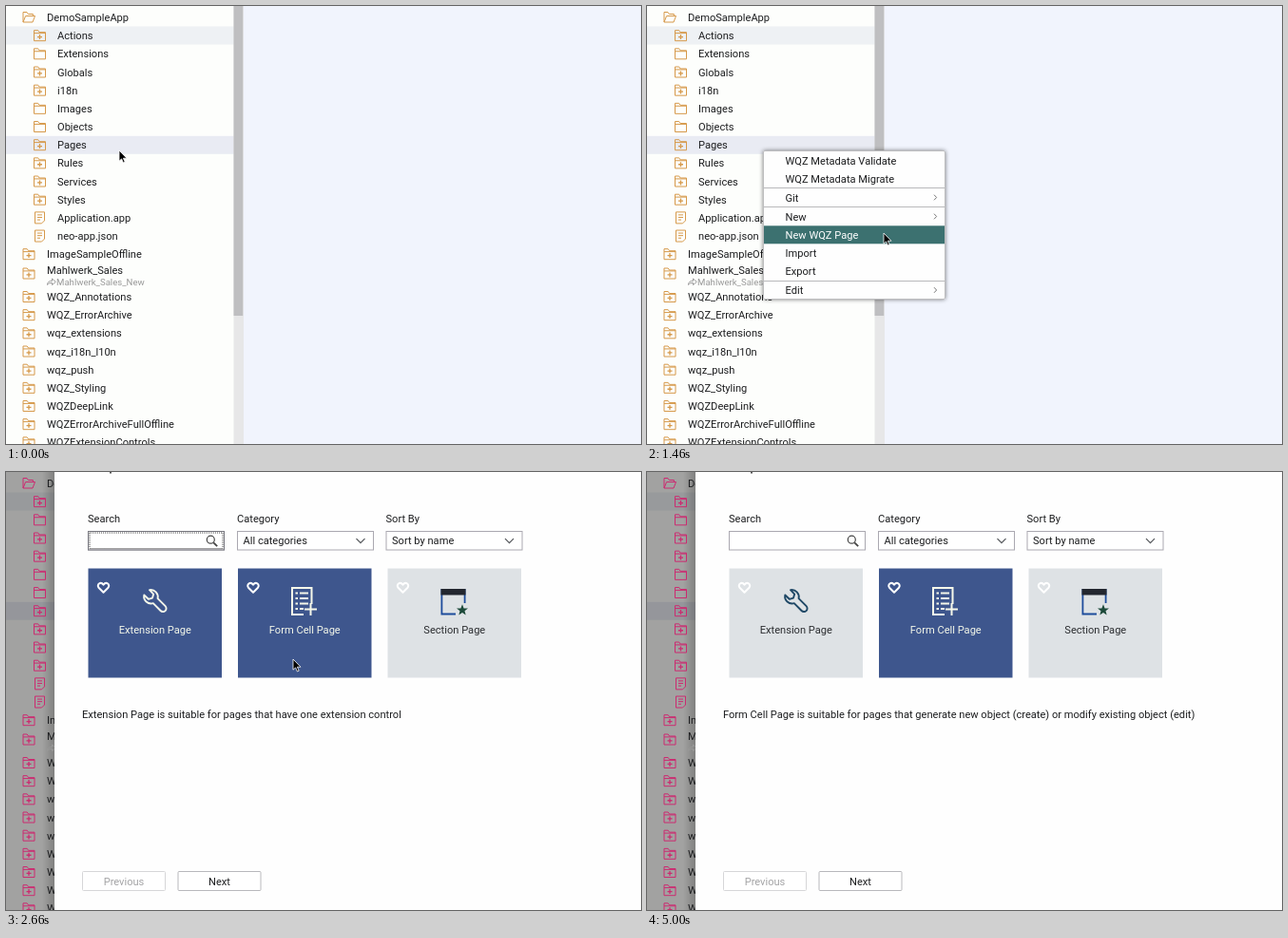
These frames come from a looping animation (668x461 px, 5.06 s). An HTML page:

```html
<!DOCTYPE html>
<html lang="en">
<head>
<meta charset="utf-8">
<title>New page wizard</title>
<style>
html, body { margin: 0; width: 100%; height: 100%; overflow: hidden; background: #fff; }
svg { display: block; width: 668px; height: 461px; }
text { font: 11.1px Roboto, Arial, sans-serif; fill: #1c1d1f; white-space: pre; }
.line { fill: none; stroke: currentColor; }

.pick, .tree, .dim, .menu, .item, .final, .dialog, .card, .caret, .focus, .before, .after, .shown {
  animation: 5060ms step-end infinite;
}

/* project tree */
.tree { color: #d6994a; animation-name: tree; }
.sub { font-size: 9.6px; fill: #999; }
.pick { fill: #e9ebf3; animation-name: pick; }
.dim { animation-name: dialog; }
@keyframes tree { 0% { color: #d6994a } 35.57%, 100% { color: #cc2a70 } }
@keyframes pick { 0% { fill: #e9ebf3 } 13.04% { fill: #dfe1f6 } 19.76%, 100% { fill: #e9ebf3 } }

/* context menu */
.menu { opacity: 0; animation-name: menu; }
.item rect { fill: var(--bg, transparent); }
.item text { fill: var(--fg, #1c1d1f); }
.pass { animation-name: pass; }
.final { animation-name: final; }
@keyframes menu { 0% { opacity: 0 } 13.04% { opacity: 1 } 35.57%, 100% { opacity: 0 } }
@keyframes pass { 0% { --bg: #3c7170; --fg: #fff } 1.3%, 100% { --bg: transparent; --fg: #1c1d1f } }
@keyframes final { 0% { --bg: transparent; --fg: #1c1d1f } 26.28%, 100% { --bg: #3c7170; --fg: #fff } }

/* wizard */
.dialog { animation-name: dialog; }
.caret { animation-name: caret; }
.focus { animation-name: focus; }
.before { animation-name: before; }
.after { animation-name: after; }
@keyframes dialog { 0% { opacity: 0 } 35.57%, 100% { opacity: 1 } }
@keyframes caret { 0%, 36.95% { opacity: 1 } 47.43%, 100% { opacity: 0 } }
@keyframes focus { 0% { opacity: 1 } 56.52%, 100% { opacity: 0 } }
@keyframes before { 0% { opacity: 1 } 56.52%, 100% { opacity: 0 } }
@keyframes after { 0% { opacity: 0 } 56.52%, 100% { opacity: 1 } }

.card > rect { fill: var(--bg); }
.card > text { fill: var(--fg); text-anchor: middle; }
.card g { color: var(--ink); }
.ext { animation-name: ext; }
.form { animation-name: form; }
.sect { animation-name: sect; }
@keyframes ext {
  0% { --bg: #57995a; --fg: #fff; --ink: #fff }
  47.43% { --bg: #3e568d; --fg: #f5f8ea; --ink: #f5f8ea }
  56.52%, 100% { --bg: #dee2e5; --fg: #2b2d30; --ink: #1f4866 }
}
@keyframes form {
  0% { --bg: #e7edf3; --fg: #606266; --ink: #3b66c0; --alt: #3c8d50 }
  47.43%, 100% { --bg: #3e568d; --fg: #f5f8ea; --ink: #f5f8ea; --alt: #f5f8ea }
}
@keyframes sect {
  0% { --bg: #e7edf3; --fg: #606266; --ink: #3b66c0; --top: #213f80; --alt: #2f7a55 }
  47.43%, 100% { --bg: #dee2e5; --fg: #2b2d30; --ink: #1d4c9c; --top: #23272f; --alt: #1d4a3a }
}

/* pointer */
.shown { animation-name: shown; }
.pointer { animation: move 5060ms ease-in-out infinite; }
@keyframes shown { 0% { opacity: 1 } 77.66%, 100% { opacity: 0 } }
@keyframes move {
  0%, 1% { transform: translate(119px, 152px) }
  2.5%, 18.58% { transform: translate(121px, 151px) }
  28.85% { transform: translate(249px, 239px) }
  32.8%, 35.57% { transform: translate(250px, 241px) }
  42.09%, 45% { transform: translate(265px, 237px) }
  52.57%, 57% { transform: translate(302px, 197px) }
  65.8% { transform: translate(281px, 269px) }
  72.33%, 100% { transform: translate(225px, 430px) }
}
</style>
</head>
<body>
<svg id="stage" viewBox="0 0 668 461" xmlns="http://www.w3.org/2000/svg">
  <defs>
    <path id="folder" class="line" d="M-6 5.5V-5.5h4.2l1.4 2H6V5.5zM-6-2.6H6"/>
    <g id="plus"><use href="#folder"/><path class="line" stroke-width="1.3" d="M-2.5 1.4h5M0-1.1v5"/></g>
    <path id="open" class="line" d="M-6 5V-5.5h4l1.4 2h5v2M-6 5l2.6-6.5H6.5L4 5z"/>
    <path id="file" class="line" d="M-5-6H5v9l-3 3h-7zM-2.5-3h5M-2.5-.4h5M-2.5 2.2h3"/>
    <path id="heart" fill="none" stroke="#fff" stroke-width="2" stroke-linejoin="round"
      d="M0 5.2-5 .2C-7.5-3-3-6.8 0-2.8 3-6.8 7.5-3 5 .2z"/>
    <path id="down" fill="none" stroke="#55585c" stroke-width="1.3" d="M-4.5-2.2 0 2.3 4.5-2.2"/>
    <linearGradient id="edge"><stop stop-opacity="0"/><stop offset="1" stop-opacity=".22"/></linearGradient>
    <filter id="shadow" x="-10%" y="-10%" width="120%" height="120%">
      <feDropShadow dx="0" dy="0" stdDeviation="2" flood-opacity=".5"/>
    </filter>
  </defs>
</svg>
<script>
const STEP = 19.17;

const label = (x, mid, str, attrs = '') => `<text x="${x}" y="${mid + 4}" ${attrs}>${str}</text>`;
const box = (x, y, w, h, attrs) => `<rect x="${x}" y="${y}" width="${w}" height="${h}" ${attrs}/>`;
const icon = (id, x, y, attrs = '') => `<use href="#${id}" x="${x}" y="${y}" ${attrs}/>`;

function tree() {
  const row = (depth, y, kind, name) =>
    icon(kind, depth ? 35.5 : 24, y) + label(depth ? 54 : 43, y, name);
  const kids = [
    ['plus', 'Actions'], ['folder', 'Extensions'], ['plus', 'Globals'], ['plus', 'i18n'],
    ['folder', 'Images'], ['folder', 'Objects'], ['plus', 'Pages'], ['plus', 'Rules'],
    ['plus', 'Services'], ['plus', 'Styles'], ['file', 'Application.app'], ['file', 'neo-app.json']
  ];
  const projects = ['WQZ_Annotations', 'WQZ_ErrorArchive', 'wqz_extensions', 'wqz_i18n_l10n', 'wqz_push',
    'WQZ_Styling', 'WQZDeepLink', 'WQZErrorArchiveFullOffline', 'WQZExtensionControls'];
  return box(0, 0, 240, 461, 'fill="#fdfefc"')
    + box(0, 21.5, 240, 19, 'fill="#eef1f4"')
    + box(0, 136.8, 240, 19, 'class="pick"')
    + box(250, 0, 418, 461, 'fill="#f1f4fd"')
    + box(239.5, 0, 10.5, 461, 'fill="#e7e7e8"')
    + box(239.5, 0, 9.7, 326, 'fill="#bfbfc1"')
    + `<g class="dim">${box(0, 0, 52, 461, 'opacity=".36"')}${box(38, 0, 14, 461, 'fill="url(#edge)"')}</g>`
    + '<g class="tree">'
    + row(0, 12, 'open', 'DemoSampleApp')
    + kids.map(([kind, name], i) => row(1, 12 + STEP * (i + 1), kind, name)).join('')
    + row(0, 261.2, 'plus', 'ImageSampleOffline')
    + icon('plus', 24, 281.5) + label(43, 278.3, 'Mahlwerk_Sales')
    + label(53, 289.6, 'Mahlwerk_Sales_New', 'class="sub"')
    + '<path d="M43.5 293.5c0-3 2-4.2 5-4.2v-2.3l3.8 3.4-3.8 3.2v-2.2c-2 0-4 .3-5 2.1z" fill="none" stroke="#999"/>'
    + projects.map((name, i) => row(0, 306 + STEP * i, 'plus', name)).join('')
    + '</g>';
}

function menu() {
  // [name, middle, has submenu, hover time in ms]
  const items = [
    ['WQZ Metadata Validate', 162.5, 0, 1070], ['WQZ Metadata Migrate', 181.7, 0, 1130],
    ['Git', 201.5, 1, 1200], ['New', 221.5, 1, 1270], ['New WQZ Page', 240.8],
    ['Import', 260], ['Export', 279.2], ['Edit', 299, 1]
  ];
  const rows = items.map(([name, y, more, at], i) => {
    const mode = at ? 'pass' : i === 4 ? 'final' : '';
    return `<g class="item ${mode}" style="animation-delay:${at || 0}ms">`
      + box(123, y - 9.5, 190, 19, '')
      + label(145.5, y, name)
      + (more ? `<path d="M302 ${y - 2.8}l2.6 2.8-2.6 2.8" fill="none" stroke="#777"/>` : '')
      + '</g>';
  });
  return '<g class="menu">'
    + box(122.5, 152.5, 191, 156, 'rx="1.5" fill="#fefefe" stroke="#bdbdbf" filter="url(#shadow)"')
    + rows.join('')
    + '<path d="M123 191.5h190M123 211.5h190M123 289.5h190" stroke="#b9b9bb"/></g>';
}

function star(cx, cy, r) {
  const pts = Array.from({ length: 10 }, (_, i) => {
    const a = i * Math.PI / 5, d = i % 2 ? r * .42 : r;
    return `${(cx + d * Math.sin(a)).toFixed(1)},${(cy - d * Math.cos(a)).toFixed(1)}`;
  });
  return `<polygon points="${pts.join(' ')}" fill="var(--alt)"/>`;
}

function cards() {
  const card = (cls, x, name, art) => `<g class="card ${cls}">`
    + box(x, 101.5, 140.5, 115, '') + icon('heart', x + 16, 121.5)
    + `<g>${art}</g>` + label(x + 70.3, 165.5, name) + '</g>';
  const wrench = `<path class="line" stroke-width="1.9" stroke-linejoin="round"
    d="M151 124.2A7.5 7.5 0 0 1 159.6 133.2L167.6 141.2A3.4 3.4 0 0 1 162.6 146L154.8 138.2
    A7.5 7.5 0 0 1 145.3 129.5L149.8 133.8 154 132.6 155.2 128.6z"/>`;
  const form = '<path class="line" stroke-width="2" d="M313 150h-12v-28h20.500v17'
    + [127.5, 133, 138.5, 144].map((y, i) => `M304.5 ${y}h2.5M309 ${y}h${i < 3 ? 9 : 4}`).join('') + '"/>'
    + '<path d="M314 144.500h13M320.500 138v13" stroke="var(--alt)" stroke-width="2"/>';
  const section = '<path class="line" stroke-width="1.8" d="M473 149.500h-14.600V124h24.200v14"/>'
    + box(457.5, 123, 26, 6.5, 'fill="var(--top)"') + star(480, 145.500, 6.3);
  return card('ext', 86.5, 'Extension Page', wrench)
    + card('form', 244, 'Form Cell Page', form)
    + card('sect', 401.5, 'Section Page', section);
}

function dialog() {
  const field = (x, name, value) => label(x, 49, name)
    + box(x + .5, 62.5, 143, 19.5, 'fill="#fff" stroke="#aaa8b0"')
    + (value ? label(x + 6.5, 72.3, value) + icon('down', x + 130, 72.3) : '');
  const button = (x, name, line, ink) =>
    box(x + .5, 420.5, 87, 20, `rx="1" fill="#fff" stroke="${line}"`)
    + label(x + 44, 430.8, name, `text-anchor="middle" style="fill:${ink}"`);
  return '<g class="dialog">'
    + box(51, 0, 617, 461, 'fill="#fefefe"')
    + box(109, 0, 2, 1.5, 'fill="#555"')
    + field(86, 'Search') + field(243, 'Category', 'All categories') + field(399.5, 'Sort By', 'Sort by name')
    + '<g class="focus">' + box(86.5, 62.5, 143, 19.5, 'fill="none" stroke="#77777f"')
    + box(88, 64, 140, 16.5, 'fill="none" stroke="#444" stroke-dasharray="1 1"') + '</g>'
    + box(93, 66, 1, 12, 'class="caret" fill="#333"')
    + '<path d="M218.300 74.300l3.900 3.900" stroke="#444" stroke-width="1.8"/>'
    + '<circle cx="215.300" cy="71.200" r="4" fill="none" stroke="#444" stroke-width="1.2"/>'
    + cards()
    + label(80, 255, 'Extension Page is suitable for pages that have one extension control', 'class="before"')
    + label(80, 255, 'Form Cell Page is suitable for pages that generate new object (create) or modify existing object (edit)', 'class="after"')
    + button(80, 'Previous', '#d6d6d8', '#a3a3a5') + button(180.5, 'Next', '#b8b8bc', '#1c1d1f')
    + '</g>';
}

const pointer = `<g class="shown"><path class="pointer" stroke="#fff" stroke-width=".8"
  d="M0 0V11.200L2.600 8.900 4.400 13 6.200 12.200 4.400 8.200H8z"/></g>`;

document.getElementById('stage').insertAdjacentHTML('beforeend', tree() + menu() + dialog() + pointer);
</script>
</body>
</html>
```
